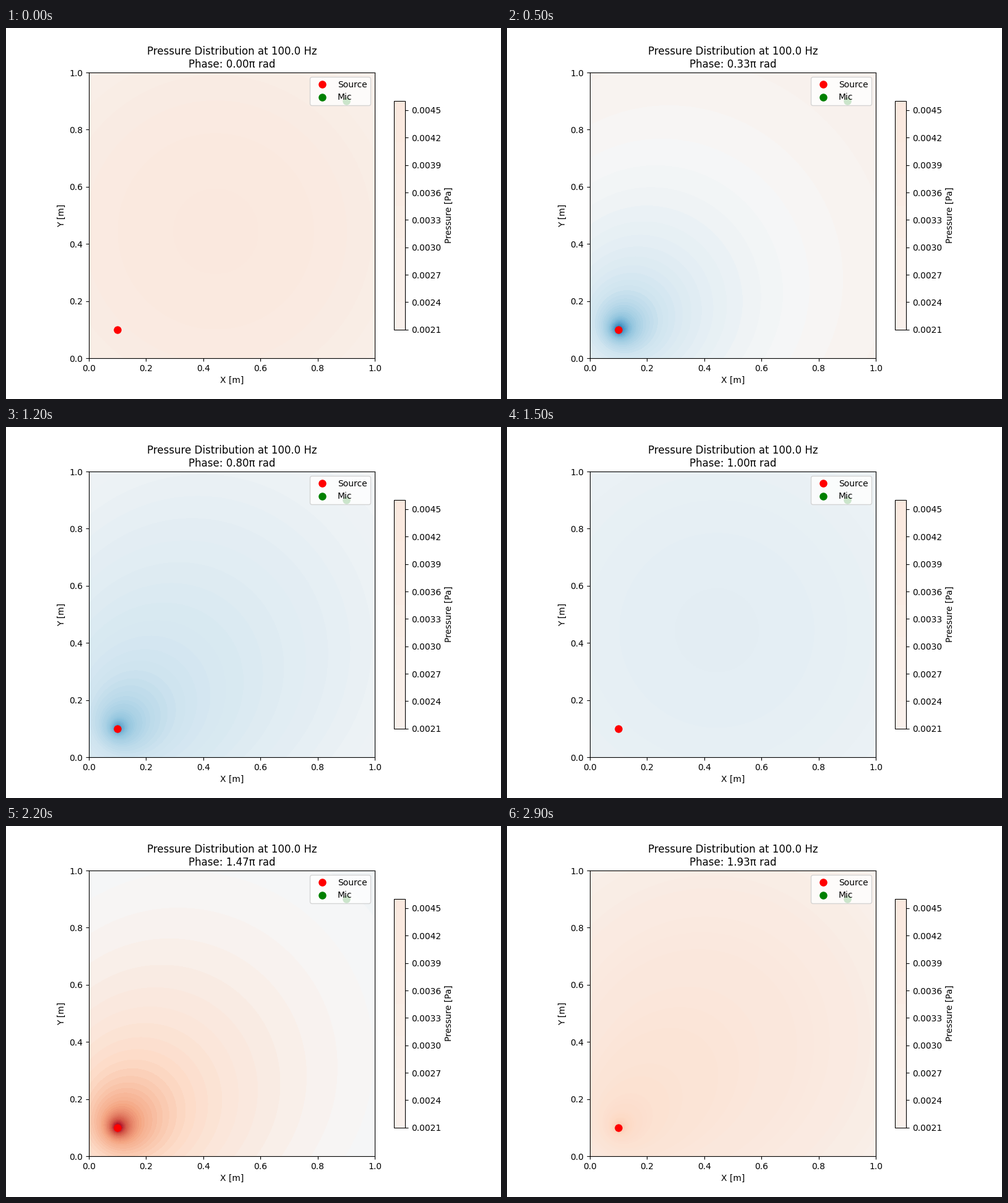
Write a matplotlib script that moves like this. It is 800x600 px and loops after 3000 ms.

```python
import numpy as np
import matplotlib.pyplot as plt
from matplotlib.animation import FuncAnimation

FRAMES = 30
INTERVAL = 100
V_LIMIT = 0.0441
SOURCE = 0.101
CENTRE = 0.444

X, Y = np.meshgrid(np.linspace(0, 1, 101), np.linspace(0, 1, 101))


def in_phase():
    """Smooth part of the field, highest near the middle of the room."""
    q = (X - CENTRE) ** 2 + (Y - CENTRE) ** 2
    return 0.00458 - 0.0036 * q - 0.0006 * q ** 2


def ring_radius():
    """Radius of the ring through each point; rings drift inwards as they grow."""
    dx, dy = X - SOURCE, Y - SOURCE
    r = np.hypot(dx, dy)
    drift = 0.4 * r / (r + 0.06)
    lean = drift * (dx + dy)
    scale = 1 - 2 * drift ** 2
    return (np.sqrt(lean ** 2 + scale * r ** 2) - lean) / scale


def quadrature():
    """Part of the field that peaks sharply at the source."""
    rho = np.hypot(ring_radius(), 0.0115)
    peak = 0.0064 * np.log(0.65 / rho) + 0.0002 * (1 / rho - 1.54)
    return peak + 0.105 * in_phase()


PRESSURE = in_phase() + 1j * quadrature()

fig, ax = plt.subplots(figsize=(8, 6), dpi=100)


def draw_field(phase):
    field = np.real(PRESSURE * np.exp(1j * phase))
    ax.set_title("Pressure Distribution at 100.0 Hz\n"
                 f"Phase: {phase / np.pi:.2f}π rad")
    return ax.contourf(X, Y, field, levels=50, cmap="RdBu_r",
                       vmin=-V_LIMIT, vmax=V_LIMIT)


contours = draw_field(0)
fig.colorbar(contours, ax=ax, label="Pressure [Pa]", shrink=0.8)
ax.plot(0.1, 0.1, "ro", markersize=8, label="Source")
ax.plot(0.9, 0.9, "go", markersize=8, label="Mic")
ax.set(xlim=(0, 1), ylim=(0, 1), xlabel="X [m]", ylabel="Y [m]")
ax.set_aspect("equal")
ax.legend(loc="upper right")


def update(i):
    global contours
    contours.remove()
    contours = draw_field(2 * np.pi * i / FRAMES)
    return [contours]


anim = FuncAnimation(fig, update, frames=FRAMES, interval=INTERVAL,
                     repeat=True, repeat_delay=0, blit=False)
plt.show()
```
